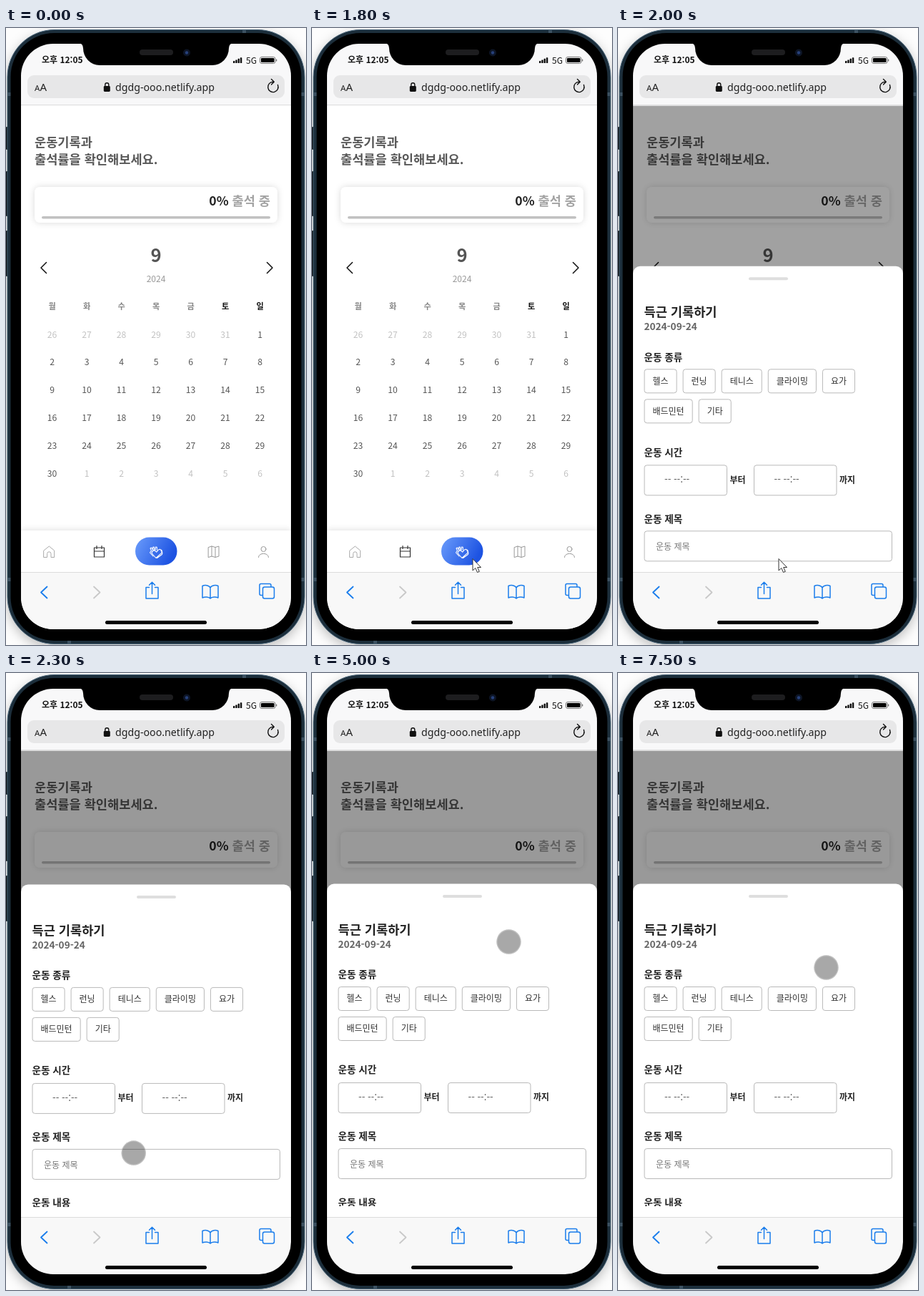
An HTML page that plays this animation: 420 by 862 pixels, repeating every 8 s.

```html
<!DOCTYPE html>
<html lang="ko">
<head>
<meta charset="utf-8">
<style>
html, body { margin: 0; width: 100%; height: 100%; overflow: hidden; background: #fdfdfd; }
svg { display: block; width: 420px; height: 862px; }
text { font-family: "Noto Sans CJK KR", "Noto Sans CJK", "Noto Sans", sans-serif; white-space: pre; }
.latin text { font-family: "Noto Sans", sans-serif; }
.line { fill: none; stroke-linecap: round; stroke-linejoin: round; }
</style>
</head>
<body>
<svg id="stage" viewBox="0 0 420 862"></svg>
<script>
const LOOP = 8000, STEP = 100, SHEET_TRAVEL = 467;

const text = (x, y, str, size, fill, weight = 400, anchor = 'start') =>
  `<text x="${x}" y="${y}" font-size="${size}" fill="${fill}" font-weight="${weight}" text-anchor="${anchor}">${str}</text>`;
const box = (x, y, w, h, r, fill, extra = '') =>
  `<rect x="${x}" y="${y}" width="${w}" height="${h}" rx="${r}" fill="${fill}" ${extra}/>`;
const line = (d, stroke, width = 1) =>
  `<path class="line" d="${d}" stroke="${stroke}" stroke-width="${width}"/>`;
const outline = (x, y, w, h) => box(x + .5, y + .5, w - 1, h - 1, 3.5, '#fff', 'stroke="#b9b9b9"');

function phone() {
  const buttons = [[138, 32], [200, 63], [283, 64]].map(([y, h]) => box(0, y, 3, h, 1, '#10161b')).join('');
  const bands = [[2, 90], [413, 90], [2, 768], [413, 768]].map(([x, y]) => box(x, y, 5, 5, 0, '#3c5161')).join('');
  return buttons +
    box(2, 2.5, 416, 858, 66, '#1b2d3b', 'stroke="#456074" filter="url(#glow)"') + bands +
    box(331, 3, 5, 4, 0, '#3c5161') + box(86, 856, 5, 4, 0, '#3c5161') +
    box(6.5, 7, 407, 849, 61, '#000');
}

function calendar() {
  const colX = i => 64.6 + 48.5 * i;
  let out = [...'월화수목금토일'].map((d, i) =>
    text(colX(i), 393, d, 11.2, i < 5 ? '#858585' : '#111', 700, 'middle')).join('');
  for (let i = 0; i < 42; i++) {
    const day = i - 5, current = day > 0 && day < 31;
    const label = day < 1 ? day + 31 : day > 30 ? day - 30 : day;
    out += text(colX(i % 7), 432.5 + 38.9 * Math.floor(i / 7), label, 12.2, current ? '#555' : '#c2c2c2', 400, 'middle');
  }
  return out;
}

function page() {
  return box(21, 107, 378, 655, 0, '#fff') +
    text(40, 166, '운동기록과', 17.6, '#595959', 700) +
    text(40, 190, '출석률을 확인해보세요.', 17.6, '#595959', 700) +
    box(40, 222, 340, 50, 8, '#fff', 'filter="url(#soft)"') +
    `<text x="370" y="248" font-size="17.6" font-weight="700" text-anchor="end" fill="#222">0% <tspan fill="#a3a3a3">출석 중</tspan></text>` +
    box(50, 263, 320, 3.5, 1.75, '#c1c1c1') +
    text(210, 326.7, '9', 25.6, '#555', 700, 'middle') +
    text(210, 354.7, '2024', 12, '#999', 400, 'middle') +
    line('M56.5 327.5L49 335L56.5 342.5M365.5 327.5L373 335L365.5 342.5', '#111', 1.5) +
    calendar() +
    box(21, 702, 378, 70, 0, '#fff', 'filter="url(#soft)"') + nav();
}

function nav() {
  return line('M53 730L60.3 724L67.6 730V739.5H63V734.5a2.7 2.7 0 0 0 -5.4 0V739.5H53z', '#aaa') +
    line('M123.5 726h14v13h-14zM123.5 731h14M127 723.5v4M134 723.5v4', '#333', 1.2) +
    box(181, 711.5, 58.5, 39, 19.5, 'url(#blue)') +
    line('M210 740.5l-5-5.5a3 3 0 0 1 4.5-4l1.2 1.2 2-2.4a3 3 0 0 1 5 3.5z' +
      'M206 738l-4.5-5 2-3-1.5-3 1.5-1 2.5 3.5-.5-4 1.6-.5 1.4 5M209 729l.5-4 1.7.2.3 4' +
      'M217 730.5a3.6 3.6 0 0 1 1.3 5l-6.8 5', '#fff', 1.1) +
    line('M283.5 725.5l4.5-1.5 5 1.5 5-1.5v14l-5 1.5-5-1.5-4.5 1.5zM288 724v14M293 725.5v14', '#999') +
    '<circle class="line" cx="360.5" cy="728" r="3.5" stroke="#999"/>' +
    line('M353.5 739.5c0-7 14-7 14 0', '#999');
}

function sheet() {
  const left = 36.5;
  const heading = (y, str) => text(left, y, str, 13.6, '#222', 700);
  const chips = (y, names) => {
    let x = left, out = '';
    for (const name of names) {
      const w = 24 + name.length * 11.04;
      out += outline(x, y, w, 34) + text(x + w / 2, y + 21.2, name, 12, '#333', 500, 'middle');
      x += w + 8;
    }
    return out;
  };
  const time = (x, after) => outline(x, 572, 116.5, 43) +
    text(x + 28.5, 598, '-- --:--', 13.3, '#555') + text(x + 120, 597.3, after, 12, '#222', 700);
  return box(21, 294.5, 378, 500, 10, '#fff') + box(183, 310, 55, 4, 2, '#dedede') +
    `<g clip-path="url(#body)">` +
    text(left, 364.7, '득근 기록하기', 17.6, '#222', 700) +
    text(left, 384, '2024-09-24', 13.6, '#666', 700) +
    heading(426.4, '운동 종류') +
    chips(438, ['헬스', '런닝', '테니스', '클라이밍', '요가']) +
    chips(480, ['배드민턴', '기타']) +
    heading(559.4, '운동 시간') + time(left, '부터') + time(190, '까지') +
    heading(652.4, '운동 제목') +
    outline(left, 664, 347.5, 43) + text(53, 691, '운동 제목', 12, '#777') +
    heading(744.6, '운동 내용') + '</g>';
}

function browser() {
  const blue = '#1a7dec';
  const bars = [0, 1, 2, 3].map(i => box(318 + 3.3 * i, 46 - 1.6 * i, 2.4, 3 + 1.6 * i, .6, '#111')).join('');
  return box(21, 22, 378, 86.7, 0, '#f8f8f9') + box(21, 107, 378, 1, 0, '#dedede') +
    text(50, 48.8, '오후 12:05', 12, '#111', 700) + bars +
    text(336, 49.5, '5G', 12, '#111', 500) +
    box(355.5, 40.5, 21.5, 9, 2.5, 'none', 'stroke="#777"') + box(357, 42, 18.5, 6, 1.2, '#000') + box(378, 43.5, 1.3, 3, .6, '#777') +
    box(30, 66, 360, 32, 9, '#e7e7e8') +
    '<g class="latin">' + text(40, 88, 'A', 11.5, '#222') + text(47.5, 88, 'A', 15, '#222') +
    text(153, 88, 'dgdg-ooo.netlify.app', 14.2, '#222') + '</g>' +
    box(136.8, 81, 9, 8, 1.4, '#111') + line('M138.8 81v-1.7a2.5 2.5 0 0 1 5 0V81', '#111', 1.4) +
    line('M380.5 79.5a7.2 7.2 0 1 1 -6.5-4.3M371.5 71.5l3.8 3.7-3.8 3.7', '#111', 1.4) +
    box(21, 760, 378, 82, 0, '#f8f8f8') + box(21, 760, 378, 1, 0, '#dcdcdc') +
    line('M57.5 780.5L49 788.5L57.5 796.5', blue, 1.8) +
    line('M123 780.5L131.5 788.5L123 796.5', '#c9c9c9', 1.8) +
    line('M200.5 781.5h-4.5v15.5h17v-15.5h-4.5M204.5 790.5V774.5M200.5 778.3l4-4 4 4', blue, 1.5) +
    line('M286 782c-2-4-8-4-11-2.5V796c3-1.5 9-1.5 11 1c2-2.5 8-2.5 11-1V779.5c-3-1.5-9-1.5-11 2.5V797', blue, 1.5) +
    line('M359 792.5h-2a2 2 0 0 1-2-2v-12a2 2 0 0 1 2-2h12a2 2 0 0 1 2 2v2', blue, 1.5) +
    box(359.5, 781, 16, 16, 2.5, '#f8f8f8', `stroke="${blue}" stroke-width="1.5"`) +
    box(139, 828, 142, 5, 2.5, '#000');
}

function notch() {
  return '<path d="M102 21a6 7 0 0 1 6 7a23 24 0 0 0 23 24h158a23 24 0 0 0 23-24a6 7 0 0 1 6-7z"/>' +
    box(187, 30, 47, 8, 4, '#1d1d1f') +
    '<circle cx="253" cy="34.5" r="5" fill="#0d1526"/><circle cx="253" cy="34.5" r="2.2" fill="#26407a"/>';
}

const stage = document.getElementById('stage');
stage.innerHTML = `<defs>
  <clipPath id="screen">${box(21, 22, 378, 818, 45, '#fff')}</clipPath>
  <clipPath id="body">${box(21, 294, 378, 451, 0, '#fff')}</clipPath>
  <linearGradient id="blue" y2=".35"><stop stop-color="#6b9cfb"/><stop offset="1" stop-color="#1d53e2"/></linearGradient>
  <filter id="soft" x="-10%" y="-40%" width="120%" height="180%"><feDropShadow dx="0" dy="0" stdDeviation="5" flood-opacity=".15"/></filter>
  <filter id="glow"><feDropShadow dx="0" dy="5" stdDeviation="8" flood-opacity=".25"/></filter>
  </defs>${phone()}
  <g clip-path="url(#screen)">${page()}
    <rect id="shade" x="21" y="107" width="378" height="655"/>
    <g id="sheet">${sheet()}</g>${browser()}
  </g>${notch()}
  <path id="arrow" d="M0 0V16.5L3.8 13L6.5 19L9.3 17.8L6.7 12H11.5z" fill="#fff" stroke="#333"/>
  <g id="touch"><circle r="17.2" opacity=".34"/><circle r="16.6" fill="none" stroke="#fff" stroke-opacity=".28" stroke-width="1.3"/></g>`;

// Pointer path: time, x, y
const path = [
  [400, 290, 868], [1300, 225, 741.5], [2100, 225, 741.5], [2600, 93.5, 540], [2900, 93.5, 540],
  [3100, 273.5, 390.5], [4900, 273.5, 390.5], [5000, 275.5, 375.5], [5400, 255, 237.5], [5600, 255, 237.5],
  [5700, 214.5, 237.5], [6200, 214.5, 237.5], [6700, 288.5, 397.5], [6900, 288.5, 397.5],
  [7100, 292, 407.5], [7400, 292, 407.5], [7500, 291.5, 411.5], [LOOP, 291.5, 411.5]
];

function pointerAt(t) {
  if (t <= path[0][0]) return path[0].slice(1);
  const i = path.findIndex(p => p[0] >= t);
  const [t0, x0, y0] = path[i - 1], [t1, x1, y1] = path[i];
  const u = (t - t0) / (t1 - t0), e = u * u * (3 - 2 * u);
  return [x0 + (x1 - x0) * e, y0 + (y1 - y0) * e];
}

const [shade, panel, arrow, touch] = ['shade', 'sheet', 'arrow', 'touch'].map(id => document.getElementById(id));

function draw() {
  const t = Math.floor(performance.now() % LOOP / STEP) * STEP;
  const left = t <= 1800 ? 1 : t >= 2600 ? 0 : Math.exp((1800 - t) / 80);
  shade.setAttribute('opacity', .4 * (1 - left));
  panel.setAttribute('transform', `translate(0 ${SHEET_TRAVEL * left})`);
  const isTouch = t > 2100, at = `translate(${pointerAt(t)})`;
  arrow.setAttribute('transform', at);
  touch.setAttribute('transform', at);
  arrow.setAttribute('visibility', isTouch || t <= 400 ? 'hidden' : 'visible');
  touch.setAttribute('visibility', isTouch ? 'visible' : 'hidden');
  requestAnimationFrame(draw);
}
draw();
</script>
</body>
</html>
```
